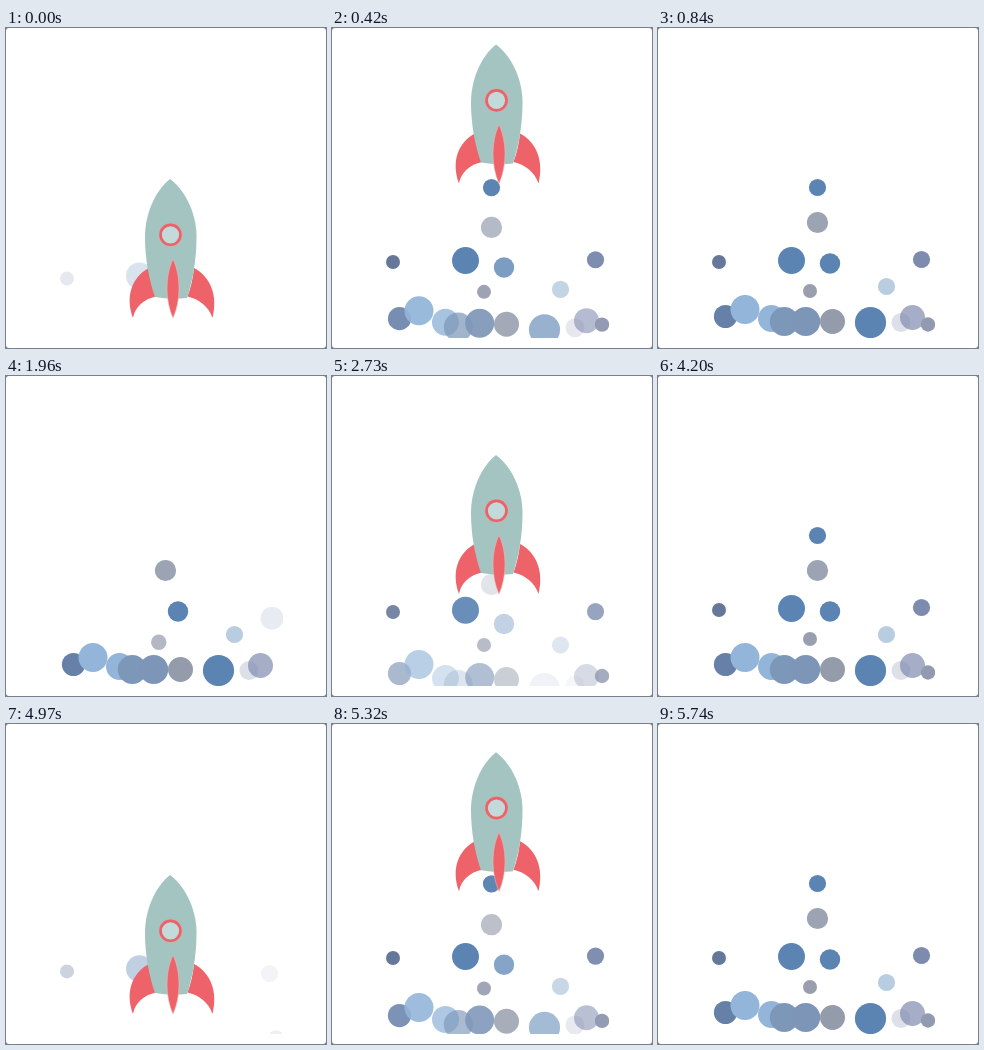
These frames come from a looping animation (320x320 px, 6.16 s). An HTML page with a canvas:

```html
<!DOCTYPE html>
<html lang="en">
<head>
<meta charset="utf-8">
<title>Rocket launch</title>
<style>
  html, body { margin: 0; width: 100%; height: 100%; overflow: hidden; background: #777; }
  canvas { display: block; width: 320px; height: 320px; background: #fff; border-radius: 3px; }
</style>
</head>
<body>
<canvas id="stage" width="320" height="320"></canvas>
<script>
const ctx = document.getElementById('stage').getContext('2d');
const LOOP = 6160, CYCLE = LOOP / 2.5;
const RED = '#ee6369';

// Smoke puffs: x, y, radius, colour, delay (ms)
const puffs = [
  [61, 234, 7, '#66789a', -40],
  [133.5, 232.5, 13.5, '#5b84b3', -55],
  [159.5, 159.5, 8.6, '#5b84b3', 0],
  [159.5, 194.5, 10.6, '#9ca3b3', 193],
  [172, 235.5, 10.2, '#5b84b3', 172],
  [263.5, 231.5, 8.6, '#7c8bae', 20],
  [228.5, 258.5, 8.6, '#b9cde0', 142],
  [152, 263, 7, '#9a9fb0', 63],
  [67.5, 288.5, 11.6, '#6680a8', 118],
  [87, 281.5, 14.5, '#93b5d9', 82],
  [113.5, 290.5, 13.5, '#93b5d9', 165],
  [126.3, 293.5, 14.5, '#7d97b8', 206],
  [147.7, 293.5, 14.5, '#7d95b7', 100],
  [174.5, 293.5, 12.5, '#949bab', 136],
  [212.5, 294.5, 15.6, '#5b84b3', 243],
  [243, 294.5, 9.5, '#dde0e8', 200],
  [254.5, 289.5, 12.5, 'rgba(124,136,172,.68)', 150],
  [270, 296.5, 7.2, '#929ab2', 5]
];

const body = new Path2D('M164 151C148 164 139 187 139 209C139 231 143 252 149 269Q165 272 181 270C187 251 190.500 231 190.500 209C190.500 187 181 164 164 151Z');
const fins = new Path2D('M143 240C126 249 119 268 127 290C129 279 138 271 150 268.500C146 259 144 250 143 240ZM188 240C205 249 212 268 206.500 290C203 279 193 271 181.500 268.500C185 259 187 250 188 240Z');
const keel = new Path2D('M167 231C159 248 159 272 167 290C175 272 175 248 167 231Z');

const clamp = v => Math.min(1, Math.max(0, v));

function disc(x, y, r, color) {
  ctx.fillStyle = color;
  ctx.beginPath();
  ctx.arc(x, y, r, 0, 2 * Math.PI);
  ctx.fill();
}

function shape(path, color) {
  ctx.fillStyle = color;
  ctx.fill(path);
}

function drawPuff([x, y, r, color, delay], t) {
  const rise = 1 - (1 - clamp((t - delay) / 450)) ** 2;
  const exit = clamp((t - 1878 - Math.max(delay, 7)) / 75);
  ctx.globalAlpha = rise * (1 - exit);
  disc(x + 3 * exit, y + 20 * (1 - rise) + 13 * exit, r * (1 + 0.4 * exit), color);
}

function drawRocket(t) {
  const back = t > 1500;
  const climb = back ? 0 : 72 * (Math.max(0, t - 50) / 216) ** 1.16;
  ctx.globalAlpha = back ? clamp((t - 2030) / 205) : 1;
  ctx.translate(0, -climb);
  shape(fins, RED);
  shape(body, '#a3c4c1');
  shape(keel, RED);
  ctx.strokeStyle = '#f0b8b4';
  ctx.lineWidth = 0.6;
  ctx.stroke(keel);
  disc(164.5, 206.8, 11.8, '#d9aaa9');
  disc(164.5, 206.8, 11.3, '#e9636a');
  disc(164.5, 206.8, 8.6, '#c3dadb');
}

function draw(now) {
  const t = now % LOOP % CYCLE;
  ctx.clearRect(0, 0, 320, 320);
  ctx.save();
  ctx.beginPath();
  ctx.rect(54, 0, 223, 310);
  ctx.clip();
  // Late in a cycle the next launch's first puffs already start
  const time = t > CYCLE - 60 ? t - CYCLE : t;
  for (const puff of puffs) drawPuff(puff, time);
  drawRocket(time);
  ctx.restore();
}

let start;
function frame(now) {
  start ??= now;
  draw(now - start);
  requestAnimationFrame(frame);
}
draw(0);
requestAnimationFrame(frame);
</script>
</body>
</html>
```
